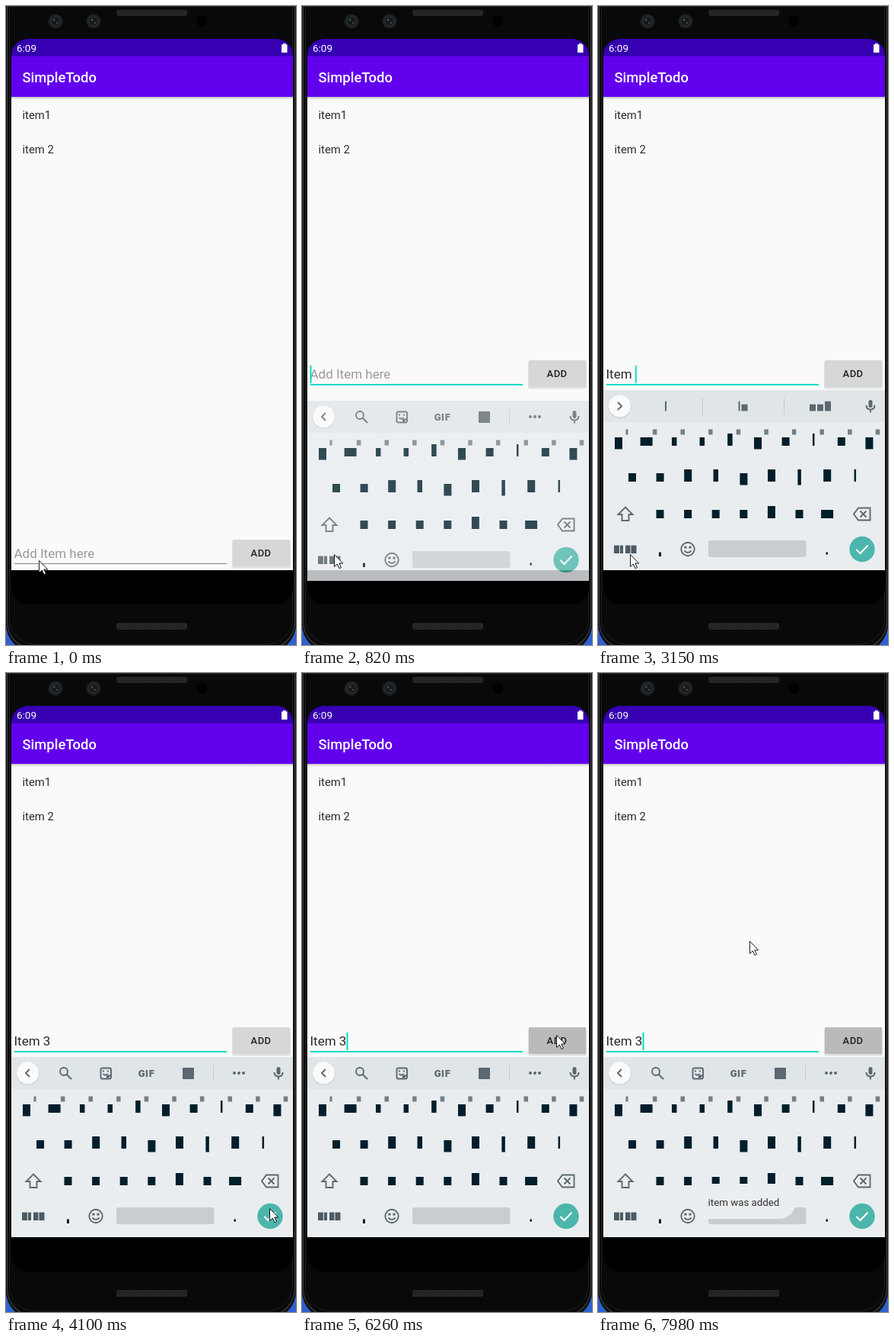
These frames come from a looping animation (381x837 px, 8000 ms). An HTML page:

```html
<!DOCTYPE html>
<html lang="en">
<head>
<meta charset="utf-8">
<title>Todo app</title>
<style>
  html, body { margin: 0; width: 100%; height: 100%; overflow: hidden; background: #2f62cf; }
  svg { display: block; width: 100vw; height: 100vh; }
  text { font-family: Roboto, "Open Sans", sans-serif; }
  .medium { font-weight: 500; }
  .item { font-size: 14.8px; fill: #2c2c2c; }
  .field { font-size: 17px; }
  .icon { fill: none; stroke: #5c686f; stroke-width: 1.9; }
  .solid { fill: #5c686f; }
</style>
</head>
<body>
<svg viewBox="0 0 381 837">
  <defs>
    <pattern id="mesh" width="3" height="3" patternUnits="userSpaceOnUse">
      <rect width="3" height="3" fill="#1b1b1b"/>
      <path d="M0 0L3 3M3 0L0 3" stroke="#343434" stroke-width=".7"/>
    </pattern>
    <linearGradient id="shade" x2="0" y2="1">
      <stop stop-color="#000" stop-opacity=".22"/>
      <stop offset="1" stop-color="#000" stop-opacity="0"/>
    </linearGradient>
    <clipPath id="screen"><rect x="7" y="43" width="370" height="741" rx="22"/></clipPath>
    <clipPath id="reveal"><rect id="typed" x="9" y="700" width="0" height="32"/></clipPath>
    <clipPath id="button"><rect x="298" y="699" width="75" height="35" rx="2"/></clipPath>
  </defs>

  <!-- phone body -->
  <rect x="0" y="-40" width="381" height="886" rx="36" fill="#111"/>
  <rect x="1.5" y="-40" width="378" height="882" rx="36" fill="#0a0a0a" stroke="#3d3d3d" stroke-width="1.2"/>
  <rect x="4.5" y="-40" width="372" height="876" rx="34" fill="#090909" stroke="#1e1e1e"/>
  <path d="M0 .5H381" stroke="#333"/>
  <g fill="url(#mesh)">
    <rect x="145" y="5" width="93" height="8" rx="3"/>
    <rect x="145" y="808" width="93" height="9" rx="3"/>
  </g>
  <g id="cameras"></g>
  <circle cx="257" cy="20" r="7" fill="#000"/>

  <!-- app -->
  <g clip-path="url(#screen)">
    <rect x="7" y="43" width="370" height="741"/>
    <rect x="7" y="119" width="370" height="620" fill="#fafafa"/>
    <rect x="7" y="119" width="370" height="4" fill="url(#shade)"/>
    <rect x="7" y="43" width="370" height="24" fill="#3700b3"/>
    <rect x="7" y="66" width="370" height="53" fill="#6200ee"/>
    <path d="M362 50.5h2V49h3.500v1.500h2V61h-7.500z" fill="#fff"/>
    <text x="14" y="60" font-size="13.5" fill="#fff">6:09</text>
    <text class="medium" x="21.5" y="100" font-size="18.4" fill="#fff">SimpleTodo</text>
    <text class="item" x="21.5" y="147.5">item1</text>
    <text class="item" x="21.5" y="193">item 2</text>

    <g id="bar">
      <text id="hint" class="field" x="10.5" y="723" fill="#9b9b9b">Add Item here</text>
      <g clip-path="url(#reveal)">
        <text class="field" x="10.5" y="723" fill="#2c2c2c">Item 3</text>
        <path id="compose" d="M10.5 725.5h34.5" stroke="#2c2c2c"/>
      </g>
      <path id="greyLine" d="M11 730.5H290" stroke="#858585"/>
      <path id="tealLine" d="M11 731H290" stroke="#03dac5" stroke-width="2"/>
      <g id="caretPos"><rect id="caret" x="10.5" y="706" width="2" height="23" fill="#03dac5"/></g>
      <rect x="297" y="699.5" width="77" height="37" rx="3" fill="#000" opacity=".1"/>
      <rect x="298" y="699" width="75" height="35" rx="2" fill="#d6d7d7"/>
      <g clip-path="url(#button)" fill="#b9bbba">
        <circle id="ripple" cx="335" cy="716" r="0"/>
        <rect id="pressed" x="298" y="699" width="75" height="35"/>
      </g>
      <text class="medium" x="335" y="721" font-size="13" letter-spacing=".4" text-anchor="middle" fill="#222">ADD</text>
    </g>

    <g id="keyboard">
      <rect x="7" y="503" width="370" height="236" fill="#e9edf0"/>
      <rect x="7" y="503" width="370" height="42" fill="#e0e5e8"/>
      <circle cx="28.5" cy="525" r="15" fill="#000" opacity=".1"/>
      <circle cx="28.5" cy="524" r="14.5" fill="#fafafa"/>
      <g id="tools">
        <path class="icon" d="M31 519l-5 5l5 5"/>
        <circle class="icon" cx="76" cy="522" r="5"/>
        <path class="icon" d="M79.5 525.5l6.5 6.5"/>
        <rect class="icon" x="124.5" y="517.5" width="13.5" height="14" rx="2"/>
        <path class="icon" d="M127.5 525q3 3.500 6 0"/>
        <path class="solid" d="M127 520.5h2v2h-2zM133 520.5h2v2h-2zM132 532.5v-6h7z"/>
        <text class="solid" x="184.5" y="528.7" font-size="13" font-weight="900" letter-spacing=".6" text-anchor="middle">GIF</text>
        <rect class="solid" x="232" y="517" width="15" height="15" rx="1"/>
        <path d="M272.5 514v21" stroke="#c3c9cc"/>
        <path d="M300 524h13" stroke="#5c686f" stroke-width="4" stroke-linecap="round" stroke-dasharray="0 6"/>
      </g>
      <g id="suggest">
        <path class="icon" d="M26 519l5 5l-5 5"/>
        <path d="M137.5 513v22M244.5 513v22" stroke="#c3c9cc"/>
      </g>
      <rect class="solid" x="355.5" y="516" width="5" height="10" rx="2.5"/>
      <path class="icon" d="M352.5 523q0 5.500 5.500 5.500t5.500-5.500M358 528.5v4"/>

      <path id="keys" fill="#001e2b"/>
      <path id="hints" fill="#737f86"/>
      <path class="icon" d="M36 656.5l9.500 9.500h-5v8h-9v-8h-5z"/>
      <path class="icon" d="M342 657.5h15.500v16H342l-6-8zM344.5 661.5l8 8m0-8l-8 8"/>
      <path fill="#4d5b63" d="M21 706.5h7v10.500h-7zm8 0h4v10.500h-4zm7 0h6.500v10.500h-6.500zm7.500 0h7v10.500h-7z"/>
      <path fill="#001e2b" d="M80 715.5h3v5.500h-3zM299.5 715.5h2.500v3h-2.500z"/>
      <circle class="icon" cx="118" cy="711.5" r="8.7"/>
      <path class="icon" d="M113.5 713.5q4.500 5 9 0"/>
      <path class="solid" d="M113.5 707.5h3v3h-3zm6 0h3v3h-3z"/>
      <rect x="145" y="700" width="128.5" height="22" rx="3" fill="#c9cdd0"/>
      <circle cx="347" cy="711.5" r="16.7" fill="#4db6ac"/>
      <path d="M339.5 712l5 5l10-10.500" fill="none" stroke="#fff" stroke-width="2"/>
    </g>

    <g id="toast">
      <rect x="124" y="669" width="136" height="46" rx="22" fill="#ebeef0"/>
      <text x="191.5" y="698" font-size="13.3" text-anchor="middle" fill="#333">item was added</text>
    </g>
  </g>

  <path id="pointer" d="M.5.5v16l3.800-3.500l2.700 5.700l2.500-1.200l-2.700-5.500h4.900z" fill="#fff" stroke="#000" stroke-width=".9"/>
</svg>
<script>
const LOOP = 8000;
const $ = id => document.getElementById(id);
const add = (id, markup) => $(id).insertAdjacentHTML('beforeend', markup);
const block = (x, bottom, w, h) => `M${x} ${bottom}v${-h}h${w}v${h}z`;

for (const x of [65, 115]) {
  add('cameras', `<circle cx="${x}" cy="20" r="9.5" fill="#1d2123"/>
    <circle cx="${x}" cy="20" r="6" fill="#15191b" stroke="#30373a"/>
    <path d="M${x - 3} 17h2.500v2.500h-2.500zM${x + 1} 21h2v2h-2z" fill="#465055"/>`);
}

// Letters are blocks shaped by their width, ascender and descender.
const widthOf = c => 'wm'.includes(c) ? 16 : 'rtfe'.includes(c) ? 6.5 : "Iil'".includes(c) ? 2.5 : c === 'j' ? 4.5 : 10;
function letter(c, x, base, size = 1) {
  if (c === "'") return block(x, base - 8, 1.5, 4);
  const up = 'Itidfhjklb3'.includes(c) ? 16 : 11;
  const down = 'qypgj'.includes(c) ? 4.5 : 0;
  return block(x, base + down * size, widthOf(c) * size, (up + down) * size);
}

const PITCH = 36.6;
const keyRow = (letters, x, base) => [...letters].map((c, i) =>
  letter(c, x + PITCH * i - widthOf(c) / 2, base)).join('');
$('keys').setAttribute('d',
  keyRow('qwertyuiop', 27, 576) + keyRow('asdfghjkl', 45, 623) + keyRow('zxcvbnm', 81.5, 671));
$('hints').setAttribute('d', Array.from({ length: 10 }, (_, i) =>
  block(38 + PITCH * i - (i ? 2.7 : 1.5), 561.5, i ? 5.5 : 3, 7)).join(''));

// Each track holds its value until the next [ms, value] step.
const sheet = document.head.appendChild(document.createElement('style'));
function track(id, prop, steps) {
  const frames = steps.map(([t, v]) => `${t / LOOP * 100}%{${prop}:${v}}`).join('');
  sheet.append(`@keyframes ${id}-anim{${frames}}
    #${id}{animation:${id}-anim ${LOOP}ms step-end infinite}`);
}
function show(id, ...spans) {
  const steps = spans.flatMap(([from, to]) =>
    [[from, 'visible'], ...(to < LOOP ? [[to, 'hidden']] : [])]);
  if (steps[0][0] > 0) steps.unshift([0, 'hidden']);
  track(id, 'visibility', steps);
}
const move = (id, steps) => track(id, 'transform',
  steps.map(([t, x, y]) => [t, `translate(${x}px,${y}px)`]));

// Suggested words, centred in three columns.
const SIZE = 0.8, GAP = 2;
function word(text, mid) {
  const advance = c => widthOf(c) * SIZE + GAP;
  let x = mid - ([...text].reduce((sum, c) => sum + advance(c), 0) - GAP) / 2;
  return [...text].map(c => {
    const d = letter(c, x, 530.5, SIZE);
    x += advance(c);
    return d;
  }).join('');
}
const suggestions = [
  [1620, "I I'm If"], [1770, "I It It's"], [1890, 'It Ite Item'],
  [2040, 'Ite Item Items'], [3150, 'I In and'], [3280, '3 33 3a']
];
suggestions.forEach(([from, words], i) => {
  const d = words.split(' ').map((w, col) => word(w, 89 + 101.5 * col)).join('');
  add('suggest', `<path id="word${i}" class="solid" d="${d}"/>`);
  show(`word${i}`, [from, suggestions[i + 1]?.[0] ?? 3420]);
});

show('hint', [0, 1620]);
show('greyLine', [0, 550]);
show('tealLine', [550, LOOP]);
show('caret', [670, 2460], [3000, 3820], [4370, 4730], [5310, LOOP]);
show('compose', [1620, 3150]);
show('tools', [0, 1620], [3420, LOOP]);
show('suggest', [1620, 3420]);
show('pressed', [6260, LOOP]);

const typing = [[0, 0], [1620, 4.6], [1770, 10.2], [1890, 19.2], [2040, 34], [3150, 38.3], [3280, 48]];
track('typed', 'width', typing.map(([t, w]) => [t, w ? `${w + 2}px` : '0px']));
move('caretPos', typing.map(([t, w]) => [t, w, 0]));
move('bar', [[0, 0, 0], [820, 0, -235]]);

const slide = [[0, 0, 0], [820, 14, .8], [950, 3, .95], [1070, 0, 1]];
track('keyboard', 'opacity', slide.map(([t, y, o]) => [t, `${o};transform:translateY(${y}px)`]));
track('ripple', 'r', [[0, '0px'], [5310, '14px'], [5430, '25px'], [5550, '35px']]);
track('toast', 'opacity', [[0, 0], [6410, .25], [6530, .5], [6650, .8], [6770, 1]]);

move('pointer', [
  [0, 43, 726], [120, 42, 721], [250, 42, 718],
  [3820, 99, 716], [3970, 262, 706], [4100, 346, 701],
  [4250, 356, 668], [4370, 363, 600], [4490, 358, 548], [4610, 338, 518],
  [4730, 324, 501], [4880, 329, 484], [5030, 334, 474],
  [7560, 296, 440], [7680, 234, 384], [7830, 201, 351], [7980, 199, 351]
]);
</script>
</body>
</html>
```
